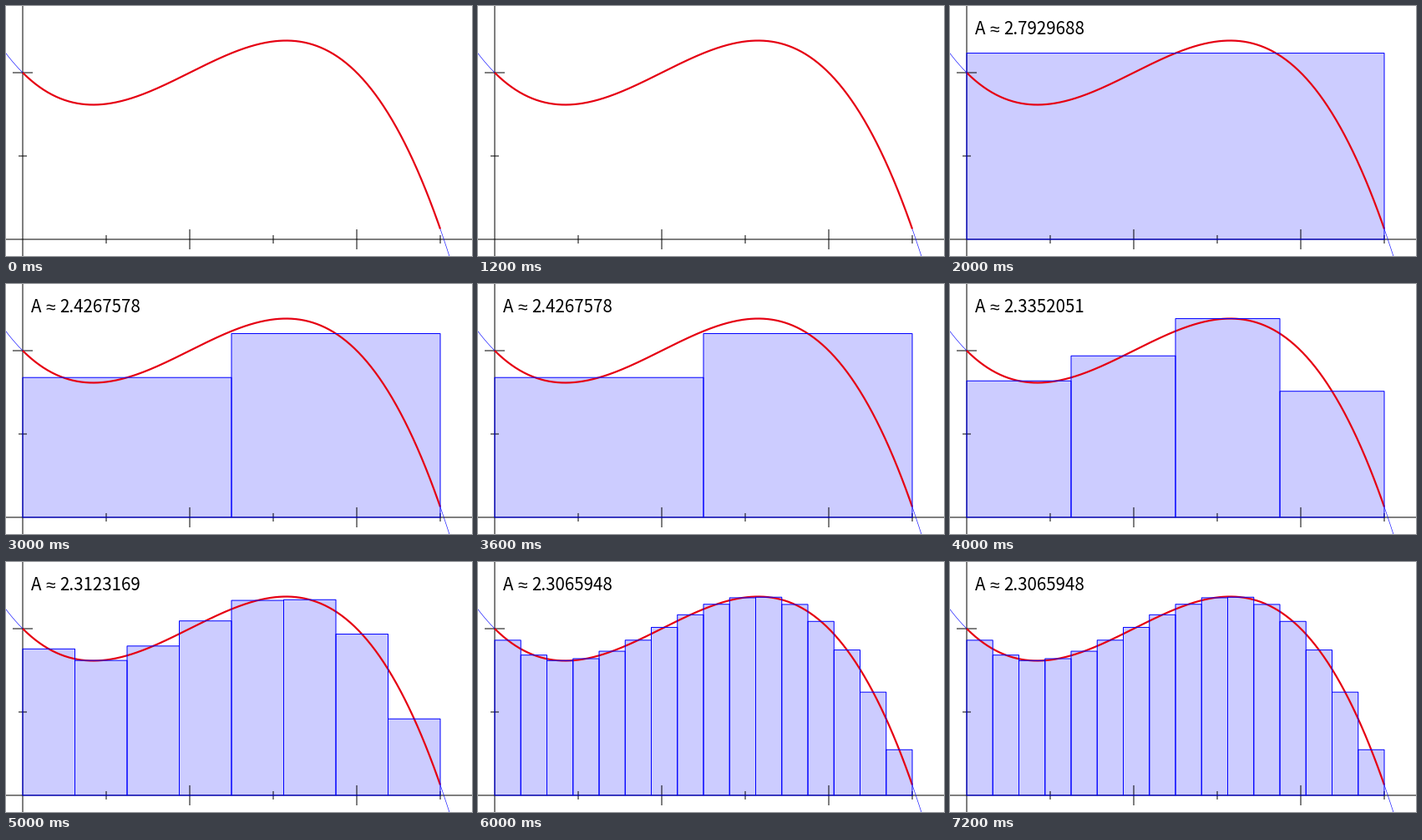
Animation, 558 px wide and 300 px high, one loop 8000 ms. Source, as a matplotlib script:

```python
import numpy as np
import matplotlib.pyplot as plt
from matplotlib.animation import FuncAnimation
from matplotlib.patches import Rectangle

W, H, DPI = 558, 300, 100
PX = 72 / DPI                # one pixel in points
X0, Y0, UNIT = 20, 280, 200  # origin and scale in pixels
END = 2.5
STEPS = [0, 0, 1, 2, 4, 8, 16, 16]  # bars shown in each second


def f(x):
    return 1 - x * (x - 1) * (x - 2) / 2


fig = plt.figure(figsize=(W / DPI, H / DPI), dpi=DPI, facecolor="white")
ax = fig.add_axes([0, 0, 1, 1])
ax.set(xlim=(0, W), ylim=(H, 0))
ax.axis("off")


def line(xs, ys, color, width=1, z=2):
    ax.plot(xs, ys, color=color, lw=width * PX, zorder=z, snap=False,
            solid_capstyle="butt")


def curve(a, b, color, width, z):
    x = np.linspace(a, b, 400)
    line(X0 + UNIT * x, Y0 - UNIT * f(x), color, width, z)


line([0, W], [Y0, Y0], "black")
line([X0, X0], [0, H], "black")
for i in range(1, 6):
    x, r = X0 + i * UNIT / 2, 5 if i % 2 else 12
    line([x, x], [Y0 - r, Y0 + r], "black")
for i in (1, 2):
    y, r = Y0 - i * UNIT / 2, 5 if i % 2 else 12
    line([X0 - r, X0 + r], [y, y], "black")

curve(-0.15, 2.6, "blue", 0.6, 3)
curve(0, END, "#e60012", 2.2, 4)

fills, edges = [], []
for _ in range(max(STEPS)):
    for group, style in (
        (fills, dict(fc="#ccccff", ec="none", zorder=1)),
        (edges, dict(fc="none", ec="blue", lw=PX, zorder=5)),
    ):
        bar = Rectangle((0, 0), 0, 0, snap=False, **style)
        group.append(ax.add_patch(bar))


def label(x, text, font, size):
    return ax.text(x, 34.5, text, family=font, fontsize=size * PX,
                   va="baseline", zorder=6)


sign = [label(30, "A", "Noto Sans CJK JP", 20.5),
        label(47.7, "≈", "Liberation Sans", 21)]
value = label(64.3, "", "Noto Sans CJK JP", 20.5)


def draw(i):
    n = STEPS[i]
    w = END / max(n, 1)
    heights = f((np.arange(n) + 0.5) * w)
    for k, pair in enumerate(zip(fills, edges)):
        for bar in pair:
            bar.set_visible(k < n)
            if k < n:
                h = UNIT * heights[k]
                bar.set_bounds(X0 + k * w * UNIT, Y0 - h, w * UNIT, h)
    for t in sign + [value]:
        t.set_visible(n > 0)
    value.set_text(f"{w * heights.sum():.7f}")
    return fills + edges + sign + [value]


anim = FuncAnimation(fig, draw, frames=len(STEPS), interval=1000,
                     init_func=lambda: draw(0), repeat=True, repeat_delay=0)
plt.show()
```
